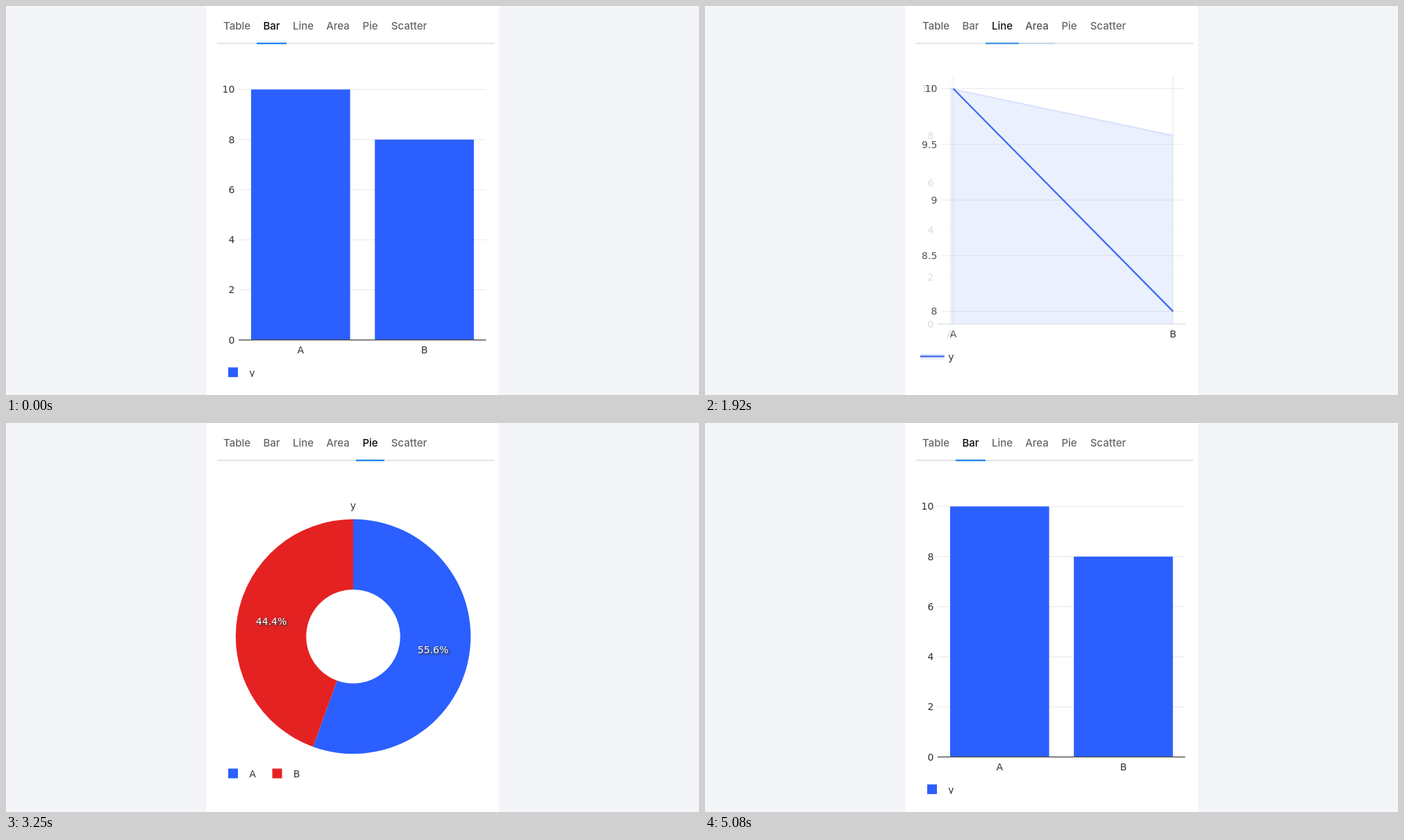
Animation of 998x561 px, one loop 5.16 s. Source, as an HTML page:

```html
<!DOCTYPE html>
<html lang="en">
<head>
<meta charset="utf-8">
<title>Chart types</title>
<style>
  html, body { margin: 0; width: 100%; height: 100%; overflow: hidden; background: #f3f5f9; }
  svg { position: absolute; left: 0; top: 0; width: 998px; height: 561px; }
  text { font: 14px "DejaVu Sans", Verdana, sans-serif; fill: #333; }
  .tab { font: 500 15px Inter, sans-serif; fill: #666; }
  .tab.on { fill: #080808; }
  .share { fill: #fff; text-shadow: 1px 1px 2px #333, 2px 2px 4px #444; }
  .grid { stroke: #ebebeb; stroke-width: 1.2; }
  .axis { stroke: #444; stroke-width: 1.2; }
  .series { stroke: #2f5fec; stroke-width: 2.3; }
</style>
</head>
<body>
<script>
const BLUE = '#2b5fff', RED = '#e52222', DOT = '#2f5fec';
const LOOP = 5160;
const RIGHT = 691.5;

// name, left edge, right edge
const TABS = [
  ['Table', 304, 361], ['Bar', 361, 404], ['Line', 404, 452],
  ['Area', 452, 504], ['Pie', 504, 545], ['Scatter', 545, 616]
];

const rect = (x, y, w, h, fill, extra = '') =>
  `<rect x="${x}" y="${y}" width="${w}" height="${h}" fill="${fill}" ${extra}/>`;
const line = (x1, y1, x2, y2, cls) =>
  `<line x1="${x1}" y1="${y1}" x2="${x2}" y2="${y2}" class="${cls}"/>`;
const text = (s, x, y, anchor = 'middle', cls = '') =>
  `<text x="${x}" y="${y}" text-anchor="${anchor}" class="${cls}">${s}</text>`;
const dot = (x, y) => `<circle cx="${x}" cy="${y}" r="3.6" fill="${DOT}"/>`;
const swatch = (x, y, fill) => rect(x, y, 14, 14, fill);

// Horizontal grid with labels, from the top value down
const rows = (labels, left, top, step) => labels.map((s, i) => {
  const y = top + i * step;
  return line(left, y, RIGHT, y, 'grid') + text(s, left - 5.7, y + 5, 'end');
}).join('');
const columns = (...xs) => xs.map(x => line(x, 101, x, 458.7, 'grid')).join('');
const names = (a, b, y) => text('A', a, y) + text('B', b, y);
const key = (s, x, y) => text(s, x, y, 'start');

const WIDE = [10, 8, 6, 4, 2, 0];
const FINE = [10, 9.5, 9, 8.5, 8];

function tabs(active) {
  return line(304, 53.8, 703.5, 53.8, 'grid" style="stroke:#e7e7e7;stroke-width:2.3') +
    TABS.map(([name, l, r], i) => {
      const on = i === active;
      return text(name, (l + r) / 2, 33.5, 'middle', on ? 'tab on' : 'tab') +
        (on ? rect(l, 52.8, r - l, 2.3, '#2385e8') : '');
    }).join('');
}

function bar() {
  return rows(WIDE, 335, 120.4, 72.26) +
    rect(353, 120.4, 142.6, 361.3, BLUE) +
    rect(531.2, 192.7, 142.6, 289, BLUE) +
    line(335, 481.7, RIGHT, 481.7, 'axis') +
    names(424.3, 602.5, 501) +
    swatch(320, 521.2, BLUE) + key('y', 350.3, 534) +
    rect(348, 535, 14, 8, '#fff');
}

function lineChart() {
  return columns(357.6, 674) + rows(FINE, 340, 119.2, 80.3) +
    line(357.6, 119.2, 674, 440.4, 'series') +
    names(357.6, 674, 478) +
    line(310, 505.4, 344.8, 505.4, 'series') + key('y', 350.3, 511);
}

function area() {
  const fill = 'fill-opacity=".53"';
  return columns(353, 674) + rows(WIDE, 335, 119.2, 67.9) +
    `<path d="M353 119.2L674 187V458.7H353Z" fill="${BLUE}" ${fill}/>` +
    line(353, 119.2, 674, 187, 'series') +
    line(335, 458.7, RIGHT, 458.7, 'axis') +
    names(353, 674, 478) +
    rect(310, 503, 34.8, 7, BLUE, fill) +
    line(310, 503, 344.8, 503, 'series') + key('y', 350.3, 511);
}

function slice(from, to, fill) {
  const at = (share, r) => {
    const a = share * 2 * Math.PI;
    return `${500 + r * Math.sin(a)} ${307.9 - r * Math.cos(a)}`;
  };
  const R = 169.2, r = 67.7, big = to - from > .5 ? 1 : 0;
  return `<path fill="${fill}" d="M${at(from, R)}A${R} ${R} 0 ${big} 1 ${at(to, R)}` +
    `L${at(to, r)}A${r} ${r} 0 ${big} 0 ${at(from, r)}Z"/>`;
}

function pie() {
  return text('y', 500, 124) +
    slice(0, 5 / 9, BLUE) + slice(5 / 9, 1, RED) +
    text('44.4%', 382, 290.5, 'middle', 'share') +
    text('55.6%', 615, 332, 'middle', 'share') +
    swatch(320, 498.4, BLUE) + key('A', 350.3, 511) +
    swatch(383.5, 498.4, RED) + key('B', 413.8, 511);
}

function scatter() {
  return columns(361.8, 669.8) + rows(FINE, 340, 123.6, 78.2) +
    dot(361.8, 123.6) + dot(669.8, 436.4) +
    names(361.8, 669.8, 478) +
    dot(327, 505.5) + key('y', 350.3, 511);
}

const scenes = [bar, lineChart, area, pie, scatter];
document.body.innerHTML = scenes.map((draw, i) =>
  `<svg viewBox="0 0 998 561">${rect(288.5, 0, 421.5, 561, '#fff')}${tabs(i + 1)}${draw()}</svg>`
).join('');
const layers = [...document.querySelectorAll('svg')];

// Each scene crossfades to the next in stepped blends
function blend(age) {
  return age < 0 ? 0 : age < 80 ? .17 : age < 160 ? .58 : 1;
}

function show(t) {
  const now = Math.min(4, Math.floor(t / 1000 - .08 + 1e-9));
  const cur = Math.max(0, now);
  const next = (cur + 1) % layers.length;
  const mix = blend(t - (cur * 1000 + 920));
  layers.forEach((el, i) => {
    el.style.opacity = i === cur ? 1 : i === next ? mix : 0;
    el.style.zIndex = i === next ? 2 : i === cur ? 1 : 0;
  });
}

const start = performance.now();
function tick() {
  show((performance.now() - start) % LOOP);
  requestAnimationFrame(tick);
}
show(0);
requestAnimationFrame(tick);
</script>
</body>
</html>
```
